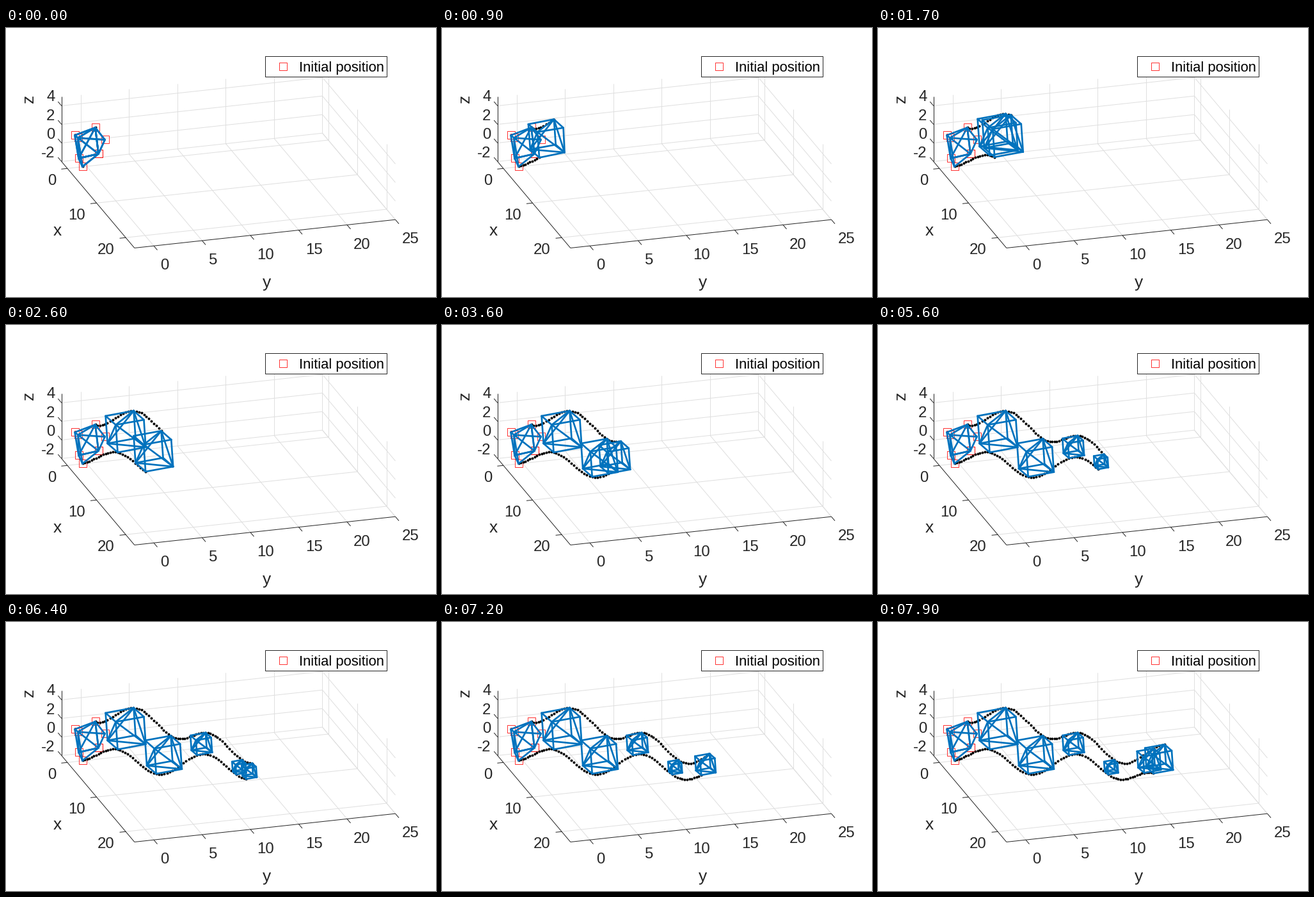
These frames come from a looping animation (672x420 px, 8000 ms). A matplotlib script:

```python
import itertools

import matplotlib.pyplot as plt
import numpy as np
from matplotlib.animation import FuncAnimation
from matplotlib.collections import LineCollection
from matplotlib.patches import Rectangle

W, H, FRAMES, STEP = 672, 420, 80, 100
BLUE, INK, GRID = "#0072bd", "#262626", "#dfdfdf"
DROPS = (15, 30, 45, 60, 75)  # steps at which the shape leaves a copy

plt.rcParams["font.family"] = "Liberation Sans"
fig = plt.figure(figsize=(W / 72, H / 72), dpi=72, facecolor="white")
ax = fig.add_axes([0, 0, 1, 1])
ax.set(xlim=(0.5, W + 0.5), ylim=(H - 0.5, -0.5))
ax.axis("off")


def project(x, y, z):
    """Axonometric view of the 3D axes, in pixels."""
    return np.array([126.6 + 4.56 * x + 15.1 * y,
                     186.5 + 5.4 * x - 1.64 * y - 14.5 * z])


def segment(p, q, color, lw=1.0, z=1):
    ax.plot([p[0], q[0]], [p[1], q[1]], color=color, lw=lw, zorder=z,
            solid_capstyle="butt")


def label(x, y, s, size=24, color=INK, **kw):
    ax.text(x, y, s, fontsize=size, color=color, va="baseline", zorder=9, **kw)


def draw_axes():
    x0, x1, y0, y1, z0, z1 = -2, 23, -2, 25, -2, 5
    xs, ys, zs = (0, 10, 20), range(0, 26, 5), (-2, 0, 2, 4)
    for x in xs:
        segment(project(x, y0, z0), project(x, y1, z0), GRID)
        segment(project(x, y1, z0), project(x, y1, z1), GRID)
    for y in ys:
        segment(project(x0, y, z0), project(x1, y, z0), GRID)
        segment(project(x0, y, z0), project(x0, y, z1), GRID)
    for z in zs:
        segment(project(x0, y0, z), project(x0, y1, z), GRID)
        segment(project(x0, y1, z), project(x1, y1, z), GRID)

    corner = project(x0, y0, z0)
    front = project(x1, y0, z0)
    segment(corner, project(x0, y0, z1), INK, z=2)
    segment(corner, front, INK, z=2)
    segment(front, project(x1, y1, z0), INK, z=2)

    for i, x in enumerate(xs):
        p = project(x, y0, z0)
        segment(p, p + (-9.5, 1), INK, z=2)
        label(78.5 + 45.7 * i, 244.5 + 54 * i, str(x), ha="right")
    for i, y in enumerate(ys):
        p = project(x1, y, z0)
        segment(p, p + (5.5, 6.5), INK, z=2)
        label(242 + 75.4 * i, 376.5 - 8.1 * i, str(y), ha="left")
    for i, z in enumerate(zs):
        p = project(x0, y0, z)
        segment(p, p + (-5.5, -6.5), INK, z=2)
        label(77, 201.5 - 29.2 * i, str(z), ha="right")

    label(81, 324, "x", 26.4, ha="center")
    label(408.5, 405, "y", 26.4, ha="center")
    label(43, 110, "z", 26.4, ha="center", rotation=90,
          rotation_mode="anchor")


def squares(x, y, z):
    ax.plot(x, y, "s", ms=12, mfc="none", mec="red", mew=0.8, zorder=z)


def draw_legend():
    ax.add_patch(Rectangle((405, 44), 190.5, 32, fc="white", ec=INK, lw=1,
                           zorder=8))
    squares([433], [60], 9)
    label(458.5, 68, "Initial position", 22, "black", ha="left")


# Cube corners as signs along the y, x and downward edges
SIGNS = np.array([(b, a, c) for c, a, b in itertools.product((-1, 1), repeat=3)])
CUBE = SIGNS @ np.array([(44, -8), (16, 14), (3, 43)]) / 2
START = np.array([(108, 167), (140, 155), (113, 171), (155, 174),
                  (114, 203), (145, 196), (120, 216), (145, 196)])
TOP, BOTTOM = 1, 6

# Cube edges plus one diagonal per face
EDGES = [(i, j) for i, j in itertools.combinations(range(8), 2)
         if np.sum(SIGNS[i] != SIGNS[j]) == 1
         or (np.sum(SIGNS[i] != SIGNS[j]) == 2 and SIGNS[i].prod() == 1)]


def cube(n):
    centre = np.array([128.4 + 3.94 * n,
                       170 + 0.74 * n - 15.2 * np.cos(0.196 * (n - 15.4))])
    return centre + (0.685 + 0.335 * np.cos(0.08 * (n - 19.7))) * CUBE


def corners(n):
    """The scattered start relaxes onto the moving cube."""
    return cube(n) + (START - cube(0)) * np.exp(-0.3 * n)


def wires(n):
    p = corners(n)
    return [p[[i, j]] for i, j in EDGES]


draw_axes()
draw_legend()
squares(START[:, 0], START[:, 1], 3)

PATH = np.array([corners(n)[[TOP, BOTTOM]] for n in range(FRAMES)])
trail, = ax.plot([], [], "o", color="black", ms=4, mew=0, zorder=4)
shapes = LineCollection([], colors=BLUE, linewidths=2.7, zorder=5,
                        capstyle="round")
ax.add_collection(shapes, autolim=False)


def update(n):
    dots = PATH[:n + 1].reshape(-1, 2)
    trail.set_data(dots[:, 0], dots[:, 1])
    segs = wires(0)
    for k in DROPS:
        if k <= n:
            segs += wires(k)
    shapes.set_segments(segs + wires(n))
    return trail, shapes


anim = FuncAnimation(fig, update, frames=FRAMES, interval=STEP, repeat=True,
                     repeat_delay=0)
plt.show()
```
